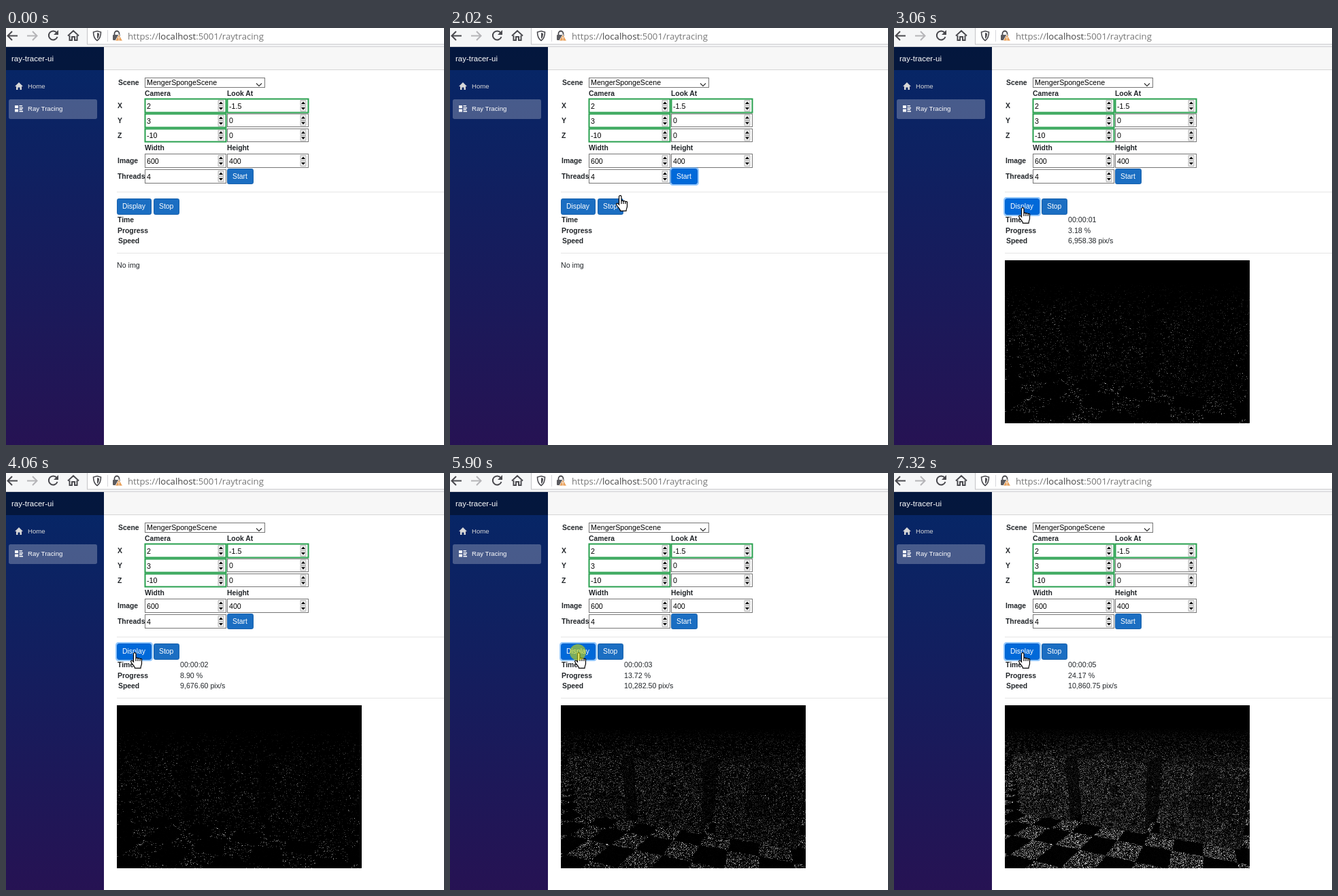
Recreate the animation shown at these times as an HTML page with a canvas. Size 644 by 614 pixels, loop 8 s.

```html
<!DOCTYPE html>
<html lang="en">
<head>
<meta charset="utf-8">
<title>ray-tracer-ui</title>
<style>
html, body { margin: 0; width: 100%; height: 100%; overflow: hidden; background: #fff; }
svg { position: absolute; left: 0; top: 0; }
canvas { position: absolute; left: 163px; top: 342px; width: 360px; height: 240px; }
text { font: 10.67px "Liberation Sans", Arial, sans-serif; fill: #212529; white-space: pre; }
.bold { font-weight: bold; font-size: 10.4px; }
.dark { fill: #000; }
.brand { font-size: 11.5px; fill: #fff; }
.nav { font-size: 9.65px; fill: #fff; }
.url { font: 13.2px "Open Sans", "Noto Sans", sans-serif; fill: #777; }
.btn rect { fill: #1b6ec2; stroke: #1861ac; }
.btn text { fill: #fff; font-size: 10.4px; }
.btn .ring { fill: none; stroke: #268fff; stroke-opacity: 0; stroke-width: 2; }
.btn.hover .face { fill: #0069d9; stroke: #0062cc; }
.btn.active .face { fill: #0062cc; stroke: #005cbf; }
.btn.focus .ring { stroke-opacity: .5; }
.btn.fading .ring { stroke-opacity: .22; }
.field { fill: #fff; stroke: #767676; }
.field.valid { stroke: #28a04e; stroke-width: 2; }
.field.hover { stroke: #333; }
.tool { fill: none; stroke: #4a4a4f; stroke-width: 2; }
</style>
</head>
<body>
<svg id="ui" width="644" height="614" viewBox="0 0 644 614">
  <defs>
    <linearGradient id="side" gradientUnits="userSpaceOnUse" x1="0" y1="28" x2="0" y2="970">
      <stop offset="0" stop-color="#052767"/><stop offset="1" stop-color="#3a0647"/>
    </linearGradient>
  </defs>

  <!-- browser bar -->
  <rect width="644" height="28" fill="#f5f6f7"/>
  <rect x="119.5" y="-3" width="540" height="27" fill="#fff" stroke="#c4c4c6"/>
  <path d="M0 27.5H644" stroke="#cfcfd2"/>
  <path class="tool" d="M17 11.5H3M9 5L2.5 11.5L9 18"/>
  <path class="tool" style="stroke:#b5b5b8" d="M31 11.5H45M39 5L45.500 11.500L39 18"/>
  <path class="tool" d="M74.500 7A6.500 6.500 0 1 0 75.500 13"/>
  <path d="M77 3V10H70Z" fill="#4a4a4f"/>
  <path class="tool" d="M91 11.500L99 4L107 11.500M93.500 11V18H97V13H101V18H104.500V11"/>
  <path class="tool" style="stroke-width:1.600" d="M134 4.500L139.500 6C139.500 12 138 16 134 18.500C130 16 128.500 12 128.500 6Z"/>
  <path d="M134 7V16C136 14.500 137 12 137 8Z" fill="#4a4a4f"/>
  <path d="M149.500 3V20" stroke="#d7d7db"/>
  <path class="tool" style="stroke-width:1.800" d="M159.500 11V8A3.500 3.500 0 0 1 166.500 8V11"/>
  <rect x="157" y="10" width="11" height="8" rx="1" fill="#5b5b60"/>
  <path d="M166 9.500L171.500 19H160.500Z" fill="#e9a15c" stroke="#fff" stroke-width=".8"/>
  <path d="M166 13V16M166 17V18" stroke="#fff" stroke-width="1.200"/>
  <text class="url" x="179" y="17">https://<tspan fill="#444">localhost</tspan>:5001/raytracing</text>

  <!-- sidebar -->
  <rect y="28" width="144" height="586" fill="url(#side)"/>
  <rect y="28" width="144" height="34" fill="#000" fill-opacity=".4"/>
  <rect x="4" y="105" width="130" height="29" rx="2.700" fill="#fff" fill-opacity=".25"/>
  <text class="brand" x="8" y="49">ray-tracer-ui</text>
  <path d="M19 80L25 86H23V91H20.500V87.500H17.500V91H15V86H13Z" fill="#d7d7d7"/>
  <text class="nav" x="32" y="89" style="fill:#d7d7d7">Home</text>
  <path d="M13 114H18V118H13ZM13 119.500H18V123.500H13ZM19.500 114H24V115.500H19.500ZM19.500 117H25V118.500H19.500ZM19.500 119.500H24V121H19.500ZM19.500 122H25V123.500H19.500Z" fill="#fff"/>
  <text class="nav" x="32" y="122">Ray Tracing</text>

  <!-- page -->
  <rect x="144" y="28" width="500" height="33" fill="#f7f7f7"/>
  <path d="M144 61.500H644" stroke="#d6d5d5"/>
  <path d="M163 241.500H644M163 331.500H644" stroke="#e5e5e5"/>
  <rect class="field" x="204.500" y="73.500" width="176" height="14"/>
  <path d="M368 81.500L372 85.500L376 81.500" fill="none" stroke="#333" stroke-width="1.200"/>
  <text class="dark" x="207" y="84">MengerSpongeScene</text>
  <g id="form"></g>
  <text id="time" x="256" y="286"></text>
  <text id="progress" x="256" y="302"></text>
  <text id="speed" x="256" y="317"></text>
  <text id="empty" x="163" y="353">No img</text>

  <!-- pointer -->
  <g id="pointer" stroke="#000" fill="#fff">
    <path id="arrow" d="M.5 .5V16L4 12.700L6.500 18.500L9 17.400L6.500 11.800H11.500Z"/>
    <path id="hand" stroke-width="1.200" d="M4.500 14V2.400A1.700 1.700 0 0 1 8 2.400V9A1.600 1.600 0 0 1 11 9.500A1.600 1.600 0 0 1 14 10.300A1.300 1.300 0 0 1 16.500 11.500V16.500C16.500 19 15 20 15 23.300H6.500C6.500 20.500 .6 16 .6 13.300C.6 11.600 3 11.600 4.500 14ZM8 9V13M11 9.500V13M14 10.300V13"/>
    <path id="beam" fill="none" d="M0 .5H2.500L3.500 1.500L4.500 .5H7M3.500 1.500V15M0 16H2.500L3.500 15L4.500 16H7"/>
  </g>
  <circle id="click" r="12" fill="#cdd90a" fill-opacity=".6"/>
</svg>
<canvas id="view" width="600" height="400"></canvas>

<script>
const LOOP = 8000;
const $ = id => document.getElementById(id);
const form = $('form');

function add(parent, tag, attrs, text) {
  const el = document.createElementNS('http://www.w3.org/2000/svg', tag);
  for (const k in attrs) el.setAttribute(k, attrs[k]);
  if (text) el.textContent = text;
  parent.appendChild(el);
  return el;
}

function label(x, y, text) {
  add(form, 'text', { x, y, class: 'bold' }, text);
}

function input(x, y, h, value, valid) {
  const box = add(form, 'rect', { x: x + .5, y: y + .5, width: 119, height: h - 1, class: valid ? 'field valid' : 'field' });
  add(form, 'text', { x: x + 3, y: y + h / 2 + 4, class: 'dark' }, value);
  const sx = x + 108, mid = y + h / 2;
  add(form, 'path', { d: `M${sx} ${mid - 8}h8v7.5h-8zM${sx} ${mid + .5}h8v7.5h-8z`, fill: '#ececec', stroke: '#a9a9a9', 'stroke-width': .8 });
  add(form, 'path', { d: `M${sx + 1} ${mid - 2.5}h6l-3 -3.5zM${sx + 1} ${mid + 2.5}h6l-3 3.5z`, fill: '#000' });
  return box;
}

function button(x, y, w, h, text) {
  const g = add(form, 'g', { class: 'btn' });
  add(g, 'rect', { class: 'ring', x: x - 1, y: y - 1, width: w + 2, height: h + 2, rx: 3.5 });
  add(g, 'rect', { class: 'face', x: x + .5, y: y + .5, width: w - 1, height: h - 1, rx: 2.2 });
  add(g, 'text', { x: x + 8, y: y + 15 }, text);
  return g;
}

[[165, 84, 'Scene'], [204, 100, 'Camera'], [325, 100, 'Look At'], [164, 118, 'X'], [164, 140, 'Y'],
 [164, 162, 'Z'], [204, 180, 'Width'], [325, 180, 'Height'], [164, 199, 'Image'], [164, 222, 'Threads'],
 [164, 286, 'Time'], [164, 302, 'Progress'], [165, 317, 'Speed']].forEach(a => label(...a));

input(325, 126, 20, '0');
input(325, 148, 20, '0');
input(325, 104, 21, '-1.5', true);
input(204, 104, 21, '2', true);
input(204, 126, 21, '3', true);
input(204, 148, 20, '-10', true);
input(204, 208, 21, '4');
const widthBox = input(204, 185, 21, '600');
const heightBox = input(325, 185, 21, '400');
const start = button(325, 207, 39, 23, 'Start');
const display = button(163, 251, 51, 24, 'Display');
const stop = button(217, 251, 38, 24, 'Stop');

// Three Menger sponges on a checkered floor, camera one unit above it.
const W = 600, H = 400, FOCAL = 507, MAX_SHARE = .2417;
const HALF = .355, PITCH = .85, MID_X = -.795, MID_Z = 2.135;
const YAW = Math.atan2(3.5, 10), DIP = Math.atan2(3, Math.hypot(3.5, 10));
const TILE = .25, TILE_X = -.653, TILE_Z = 1.332;

function random(n) {
  n = Math.imul(n ^ n >>> 16, 0x45d9f3b);
  n = Math.imul(n ^ n >>> 15, 0x2c1b3c6d);
  return ((n ^ n >>> 16) >>> 0) / 4294967296;
}

function local(x, y, z) {
  const k = Math.max(-1, Math.min(1, Math.round((x - MID_X) / PITCH)));
  return [(x - MID_X - k * PITCH) / HALF, y / HALF - 1, (z - MID_Z) / HALF];
}

function sponge(x, y, z) {
  const p = local(x, y, z);
  const q = p.map(v => Math.abs(v) - 1);
  let d = Math.hypot(...q.map(v => Math.max(v, 0))) + Math.min(Math.max(...q), 0);
  for (let i = 0, s = 1; i < 3; i++) {
    const [a, b, c] = p.map(v => {
      const m = v * s - 2 * Math.floor(v * s / 2) - 1;
      return Math.abs(1 - 3 * Math.abs(m));
    });
    s *= 3;
    d = Math.max(d, (Math.min(Math.max(a, b), Math.max(b, c), Math.max(c, a)) - 1) / s);
  }
  return d * HALF;
}

function spongeLight(x, y, z) {
  const e = .0006, d = sponge(x, y, z);
  const nx = Math.abs(sponge(x + e, y, z) - d);
  const ny = Math.abs(sponge(x, y + e, z) - d);
  const nz = Math.abs(sponge(x, y, z + e) - d);
  const [lx, , lz] = local(x, y, z);
  if (nz >= nx && nz >= ny) return lz < -.95 ? 118 : 45;
  if (ny > nx) return 80;
  return Math.abs(lx) > .95 ? 35 : Math.abs(lx) > .2 ? 150 : 60;
}

function floorLight(x, z) {
  const odd = Math.floor((x - TILE_X) / TILE) + Math.floor((z - TILE_Z) / TILE) & 1;
  return odd ? 6 : 230 / (1 + .16 * Math.hypot(x + .5, z - 1.4));
}

function trace(px, py) {
  const u = (px - W / 2) / FOCAL, v = (py - H / 2) / FOCAL;
  const ahead = Math.cos(DIP) - v * Math.sin(DIP);
  const dy = -Math.sin(DIP) - v * Math.cos(DIP);
  if (dy > -.001) return 0;
  const dx = u * Math.cos(YAW) - ahead * Math.sin(YAW);
  const dz = u * Math.sin(YAW) + ahead * Math.cos(YAW);
  const end = -1 / dy;
  let t = (1 - 2 * HALF) * end;
  for (let i = 0; i < 70 && t < end; i++) {
    const x = dx * t, y = 1 + dy * t, z = dz * t;
    if (z > MID_Z + HALF + .01) break;
    const d = sponge(x, y, z);
    if (d < .0008) return spongeLight(x, y, z);
    t += d;
  }
  return floorLight(dx * end, dz * end);
}

const ctx = $('view').getContext('2d');
const image = ctx.createImageData(W, H);
const samples = [];
for (let i = 0; i < W * H; i++) {
  image.data[i * 4 + 3] = 255;
  const order = random(i + 1);
  if (order < MAX_SHARE) {
    const light = trace(i % W, Math.floor(i / W)) * (.7 + .6 * random(i + 700001));
    samples.push([i * 4, order, light]);
  }
}

let shown = -1;
function paint(share) {
  if (share === shown) return;
  shown = share;
  for (const [i, order, light] of samples) {
    image.data[i] = image.data[i + 1] = image.data[i + 2] = order < share ? light : 0;
  }
  ctx.putImageData(image, 0, 0);
}

// Timelines: each entry holds from its time until the next.
const moves = [[0, ''], [200, 'arrow', 291, 450], [400, 'arrow', 222, 326], [620, 'hand', 199, 262],
  [800, 'beam', 281, 189], [1020, 'beam', 343, 195], [1220, 'hand', 343, 212], [1620, 'hand', 343, 213],
  [2020, 'hand', 244, 246], [2240, 'hand', 214, 250], [2440, 'hand', 191, 263], [2640, 'hand', 183, 264]];
const stats = [[0, '', '', ''],
  [3060, '00:00:01', '3.18 %', '6,958.38 pix/s'], [4060, '00:00:02', '8.90 %', '9,676.60 pix/s'],
  [5280, '00:00:03', '13.72 %', '10,282.50 pix/s'], [6100, '00:00:04', '18.81 %', '10,703.30 pix/s'],
  [7320, '00:00:05', '24.17 %', '10,860.75 pix/s']];
const shares = [[0, 0], [3060, .0318], [4280, .089], [5280, .1372], [6100, .1881], [7320, .2417]];
const clicks = [[1620, 1820], [2840, 3060], [5080, 5280], [5900, 6100], [7120, 7320]];
const presses = [[5080, 5280], [6100, 6320]];

const at = (list, t) => list.filter(e => e[0] <= t).pop();
const within = (t, a, b) => t >= a && t < b;
const during = (list, t) => list.some(([a, b]) => within(t, a, b));

function frame() {
  const t = performance.now() % LOOP;

  const [, kind, x, y] = at(moves, t);
  for (const id of ['arrow', 'hand', 'beam']) $(id).style.display = id === kind ? '' : 'none';
  if (kind) $('pointer').setAttribute('transform', `translate(${x} ${y})`);
  const pressed = during(clicks, t);
  $('click').style.display = pressed ? '' : 'none';
  if (pressed) {
    $('click').setAttribute('cx', x + 5);
    $('click').setAttribute('cy', y);
  }

  widthBox.classList.toggle('hover', within(t, 800, 1020));
  heightBox.classList.toggle('hover', within(t, 1020, 1220));
  start.classList.toggle('hover', within(t, 1220, 2240));
  start.classList.toggle('focus', within(t, 1820, 2840));
  start.classList.toggle('fading', within(t, 2840, 3060));
  stop.classList.toggle('hover', within(t, 2240, 2440));
  display.classList.toggle('hover', t >= 2440);
  display.classList.toggle('focus', t >= 3060);
  display.classList.toggle('active', during(presses, t));

  const [, time, progress, speed] = at(stats, t);
  $('time').textContent = time;
  $('progress').textContent = progress;
  $('speed').textContent = speed;

  const share = at(shares, t)[1];
  $('view').style.visibility = share ? 'visible' : 'hidden';
  $('empty').style.display = share ? 'none' : '';
  paint(share);
  requestAnimationFrame(frame);
}
frame();
</script>
</body>
</html>
```
